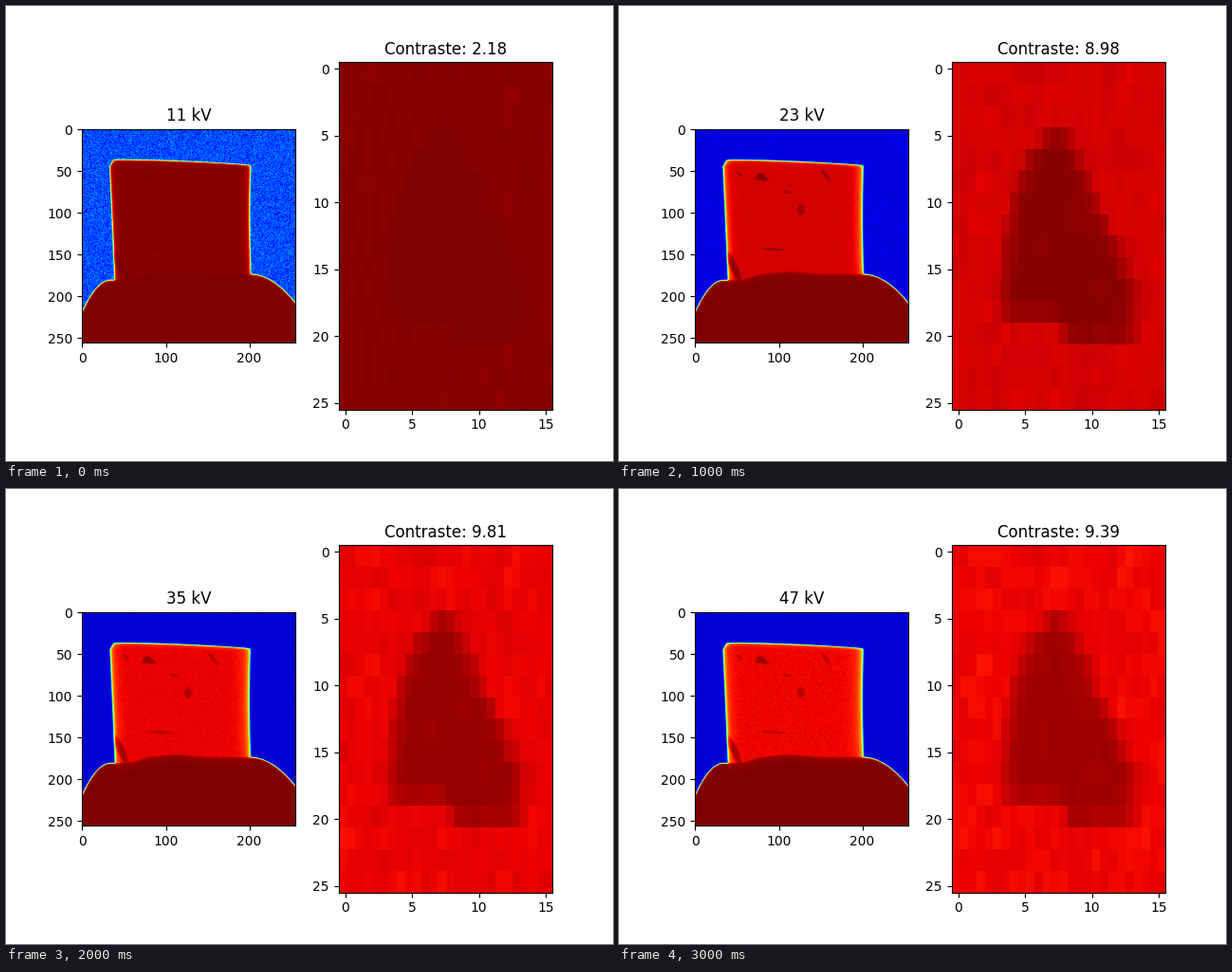
A matplotlib script that plays this animation: 640x480 px, repeating every 3500 ms.

```python
import numpy as np
import matplotlib.pyplot as plt
from matplotlib.animation import FuncAnimation

SIZE = 256
ROI = (slice(50, 66), slice(66, 92))
CONTRAST = [2.18, 7.23, 8.98, 9.39, 9.81, 10.01, 9.39]
STEPS = len(CONTRAST)

Y, X = np.mgrid[0:SIZE, 0:SIZE].astype(float)


def step(d, width=0.4):
    return 1 / (1 + np.exp(-np.clip(d / width, -40, 40)))


def rim(d, width):
    """Thickness that falls off towards a rounded edge."""
    return 1 - 0.7 * np.exp(-np.maximum(d, 0) / width)


def streak(cx, cy, length, width, angle, strength):
    """Soft-edged ellipse; angle in degrees, clockwise on screen."""
    a = np.radians(angle)
    u = (X - cx) * np.cos(a) + (Y - cy) * np.sin(a)
    v = (Y - cy) * np.cos(a) - (X - cx) * np.sin(a)
    return strength * step(1 - np.hypot(u / length, v / width), 0.12)


def make_table():
    """Signed depth below the table's surface."""
    top = 174 + 7 * step(68 - X, 5) - 3 * np.exp(-((X - 112) / 26) ** 2)
    top += 38 * np.maximum(1 - X / 34, 0) ** 2
    top += 35 * (np.maximum(X - 200, 0) / 55) ** 2
    return (Y - top) / np.hypot(1, np.gradient(top, axis=1))


def make_block():
    left = X - np.interp(Y, [36, 45, 180], [38, 33, 39])
    top = Y - 37 - 6.5 * (np.maximum(X - 40, 0) / 160) ** 1.7
    right = 199.7 + 1.5 * ((Y - 105) / 70) ** 2 - X
    inside = step(left) * step(top, 0.3) * step(right)
    return inside * rim(left, 4) * rim(top, 1.5) * rim(right, 5.5)


def make_drop():
    """Widening drop with a stepped lower edge, in ROI cells."""
    row, col = np.mgrid[0:16, 0:26].astype(float)
    left = 5.4 + 5.3 * np.exp((3 - row) / 2.6)
    right = np.minimum(14.6 + 1.15 * (row - 3), 22.4)
    bottom = 11.65 + 1.1 * step(col - 13)
    sides = np.minimum(col + 1 - left, right - col) / 2.8
    ends = np.minimum(row - 2.2, bottom - row)
    return np.clip(sides, 0, 1) * np.clip(ends, 0, 1)


def make_defects():
    field = np.max([
        streak(156, 56, 8, 2, 52, 0.55),
        streak(110, 76, 5, 1.3, 5, 0.5),
        streak(126, 97, 4, 5.5, 0, 0.6),
        streak(94, 144, 13, 1.3, 4, 0.6),
        streak(52, 54, 4, 1.4, 48, 0.55),
        streak(46, 165, 17, 4, 66, 0.95),
    ], axis=0)
    field[ROI] = make_drop()
    return field


def make_grain():
    grain = np.random.default_rng(7).normal(0, 0.02, (SIZE, SIZE))
    return grain + 0.5 * np.roll(grain, 1, axis=1)


table, block = make_table(), make_block()
defects, grain = make_defects(), make_grain()
# The table covers a little less right under the block.
cover = step(table, 0.35)
cover *= 1 - 0.3 * block * np.exp(-np.maximum(table, 0) / 6)


def scan(i):
    """Absorbed share (0..1) at tube voltage number i."""
    air = 0.074 + 0.126 * np.exp(-1.25 * i)
    solid = 0.902 + 0.089 * np.exp(-0.68 * i)
    defect = 0.9995 - 0.0295 * np.sin(np.pi / 2 * i / (STEPS - 1)) ** 1.5

    noise = np.random.default_rng(100 + i).normal(0, 1, (2, SIZE, SIZE))
    air_noise = (0.005 + 0.04 * np.exp(-1.7 * i)) * noise[0] * (1 - block)
    flicker = (0.008 + 0.025 * np.exp(-1.5 * i)) * noise[1]

    mu = np.log((1 - air) / (1 - solid))
    extra = np.log((1 - solid) / (1 - defect))
    depth = block * (mu * (1 + grain + flicker) + extra * defects)
    image = 1 - (1 - air - air_noise) * np.exp(-depth)
    image += (1 - image) * cover
    return np.clip(image, 0, 1)


fig, (ax_full, ax_roi) = plt.subplots(1, 2, figsize=(6.4, 4.8), dpi=100)
look = dict(cmap="jet", vmin=0, vmax=1)
first = scan(0)
full_view = ax_full.imshow(first, **look)
roi_view = ax_roi.imshow(first[ROI], extent=(-0.5, 15.5, 25.5, -0.5), **look)


def update(i):
    image = scan(i)
    full_view.set_data(image)
    roi_view.set_data(image[ROI])
    ax_full.set_title(f"{11 + 6 * i} kV")
    ax_roi.set_title(f"Contraste: {CONTRAST[i]:.2f}")
    return full_view, roi_view


anim = FuncAnimation(fig, update, frames=STEPS, interval=500,
                     repeat=True, repeat_delay=0)
plt.show()
```
